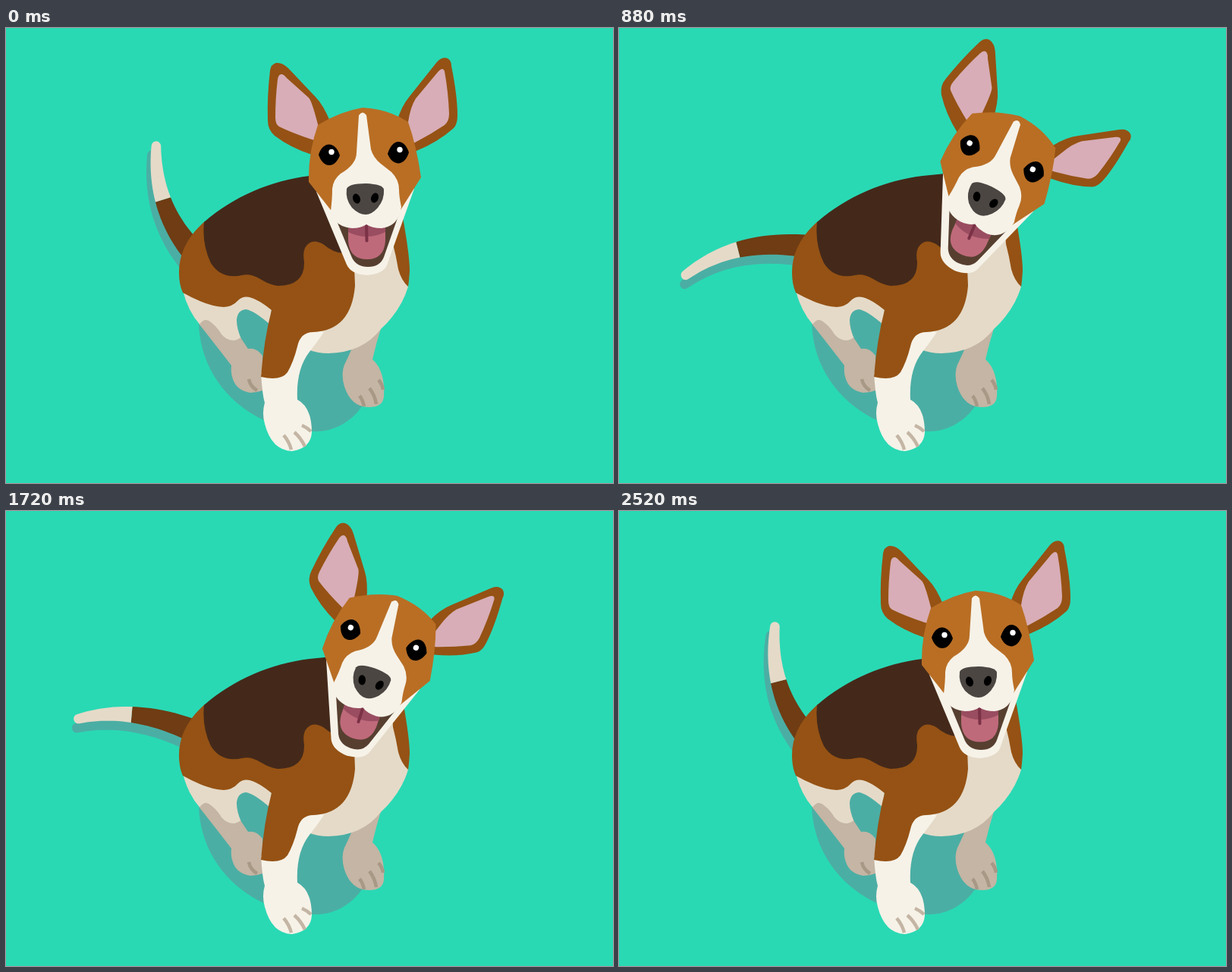
An HTML page that plays this animation: 800 px wide and 600 px high, repeating every 2.56 s.

```html
<!DOCTYPE html>
<html lang="en">
<head>
<meta charset="utf-8">
<title>Happy dog</title>
<style>
html, body { margin: 0; height: 100%; overflow: hidden; background: #29d9b4 }
svg { display: block; width: 800px; height: 600px }
.shade { fill: #4baea4 }
.brown { fill: #955214 }
.bark { fill: #6f3c13 }
.cream { fill: #e5dac8 }
.dim { fill: #c4b5a4 }
.white { fill: #f6f2e8 }
.pink { fill: #d8adb7 }
.line { fill: none; stroke: #a89886; stroke-width: 4.5 }
</style>
</head>
<body>
<svg viewBox="0 0 800 600">
  <path id="tailShade" class="shade"/>
  <path id="tailRoot" class="bark"/>
  <path id="tailTip" class="cream"/>

  <path class="shade" d="M254 385C254 470 325 532 408 532C440 532 460 512 470 498L450 400L300 350Z"/>
  <path class="dim" d="M457 420Q450 436 446 444Q441 456 446 473Q455 500 478 500Q497 500 498 486Q500 452 483 437Q488 415 495 393Z"/>
  <path class="line" d="M466 485Q470 490 472 499M479 475Q486 484 488 496M491 464Q496 470 497 477"/>
  <path class="cream" d="M233 346Q240 375 258 394L300 415L310 410Q304 396 304 385Q305 372 316 371Q326 372 348 391L352 350L300 340Z"/>
  <path class="dim" d="M255 391Q262 381 270 388Q279 395 284 404Q291 412 300 412Q306 411 309 408L319 423Q330 421 338 432V478Q330 481 322 481Q304 478 299 463Q296 455 297 445Q284 428 255 391Z"/>
  <path class="line" d="M320 463Q322 473 331 478"/>
  <path class="cream" d="M440 250L512 260Q518 330 530 341Q521 372 494 397Q470 428 425 429Q410 429 398 424L390 395Z"/>
  <path class="brown" d="M523 250Q532 300 532 320Q531 335 530 341Q521 333 517 318Q514 300 510 285L508 255Z"/>
  <path class="white" d="M336 455Q338 485 341 494Q337 508 341 522Q350 557 377 558Q402 554 403 533Q403 500 384 490Q382 450 400 427Q408 417 419 401L400 395Z"/>
  <path class="line" style="stroke:#c4b5a4" d="M366 537Q373 545 376 556M380 533Q389 541 394 552M390 524Q397 527 402 532"/>
  <path class="brown" d="M262 255Q228 285 228 322Q228 338 233 349Q265 367 287 368Q299 367 305 360Q312 353 321 355Q333 358 350 372Q340 410 336 460Q362 466 371 454Q379 440 384 420Q388 401 405 401Q455 399 460 340Q460 320 457 300L440 250L400 200Z"/>
  <path fill="#44291a" d="M261 256C300 222 350 201 400 195L440 191L445 297Q432 297 418 285Q402 276 394 290Q391 297 393 308Q394 340 358 340Q348 339 335 331Q322 323 311 326Q284 332 270 310Q258 285 261 256Z"/>

  <g id="head">
    <g id="earL">
      <path class="brown" d="M428 125Q418 101 408 91L372 53Q364 45 356 46Q349 48 348 56Q344 90 345 122Q345 134 354 142Q375 158 403 167L440 170Z"/>
      <path class="pink" d="M358 68Q359 60 364 61Q367 62 370 66L399 92Q403 96 411 127L418 151L403 147Q376 138 360 130Q355 127 355 118Q355 92 358 68Z"/>
    </g>
    <g id="earR">
      <path class="brown" d="M515 124Q521 103 532 90L567 46Q574 37 582 40Q587 43 587 50Q595 90 595 115Q595 127 590 132Q570 150 541 162L510 165Z"/>
      <path class="pink" d="M570 57Q576 51 578 57Q583 85 584 113Q584 123 578 128Q560 140 539 151L524 157L530 124Q533 104 540 93Z"/>
    </g>
    <path class="white" d="M409 216L449 312Q455 325 476 326Q497 324 502 313L538 212Z"/>
    <path fill="#573f30" d="M432 245L456 303Q462 315 477 315Q493 315 498 302L518 245Z"/>
    <path id="tongue" fill="#bf6a7b"/>
    <path fill="#9a4d60" d="M451 255V269Q475 281 500 269V255Z"/>
    <path id="crease" fill="none" stroke="#7b3246" stroke-width="4" stroke-linecap="round"/>
    <path fill="#b96e24" d="M411 128Q440 110 470 105Q505 107 530 124Q541 155 547 197L520 240H428L399 203Q398 165 411 128Z"/>
    <path class="white" d="M465 115Q470 108 475 115L481 160Q484 171 494 179L508 190Q518 200 518 213Q518 222 521 236Q517 262 495 264Q482 264 475 259Q468 264 456 264Q432 262 428 241Q430 225 430 212Q431 200 441 192Q462 180 462 164Z"/>
    <path fill="#4c4642" d="M449 212Q452 205 474 205Q497 206 498 213Q499 226 490 237Q482 246 474 246Q465 246 456 237Q447 226 449 212Z"/>
    <ellipse cx="462" cy="225" rx="4.8" ry="6.6" transform="rotate(-20 462 225)"/>
    <ellipse cx="486" cy="224" rx="4.8" ry="6.6" transform="rotate(20 486 224)"/>
    <path d="M412 167C418 149 434 149 440 168C434 185 418 186 412 167ZM503 166C509 145 525 145 531 164C525 183 510 183 503 166Z"/>
    <g id="glints" fill="#fff"><circle cx="429" cy="163.5" r="3.7"/><circle cx="519" cy="160.5" r="3.7"/></g>
  </g>
</svg>
<script>
const LOOP = 2560, STEP = 40, RAD = Math.PI / 180;
const { sin, cos, max, min, sqrt } = Math;
const part = id => document.getElementById(id);
const set = (id, attr, value) => part(id).setAttribute(attr, value);

function ease(x) {
  x = max(0, min(1, x));
  return x < .5 ? 2 * x * x : 1 - 2 * (1 - x) ** 2;
}
// Tilts over 480 ms, holds, and tilts back 1480 ms after it began.
const tilt = (t, start) => ease((t - start) / 480) - ease((t - start - 1480) / 480);

const base = [240, 287];
const polar = (deg, r) => [base[0] - r * cos(deg * RAD), base[1] - r * sin(deg * RAD)];
const wave = (p, [m, a, b, c, d, e]) =>
  m + a * cos(p) + b * sin(p) + c * sin(2 * p) + d * cos(3 * p) + e * sin(3 * p);

// Outline of a tapering band around a quadratic curve, from u0 to u1.
function band(mid, tip, u0, u1, capped) {
  const ctrl = mid.map((m, i) => 2 * m - (base[i] + tip[i]) / 2);
  const left = [], right = [];
  for (let i = 0; i <= 12; i++) {
    const u = u0 + (u1 - u0) * i / 12, v = 1 - u;
    const [x, y] = [0, 1].map(k => v * v * base[k] + 2 * u * v * ctrl[k] + u * u * tip[k]);
    const [dx, dy] = [0, 1].map(k => v * (ctrl[k] - base[k]) + u * (tip[k] - ctrl[k]));
    const w = (14.7 - 8.4 * u) / sqrt(dx * dx + dy * dy);
    left.push(`${x + dy * w} ${y - dx * w}`);
    right.unshift(`${x - dy * w} ${y + dx * w}`);
  }
  return `M${left.join('L')}${capped ? 'A6.3 6.3 0 0 1 ' : 'L'}${right.join('L')}Z`;
}

function drawTail(t) {
  const p = t / 640 * 2 * Math.PI;
  const midDeg = wave(p, [25.7, 36.1, -5.06, -1.8, -.4, -2.56]);
  const tipDeg = wave(p, [26.2, 49.6, -3.56, -1.5, -3.56, -2.72]);
  const mid = polar(midDeg, 69 + .38 * max(0, 34 - midDeg));
  const tip = polar(tipDeg, 134.5 + .0058 * (tipDeg - 48) ** 2);
  set('tailRoot', 'd', band(mid, tip, -.12, .5));
  set('tailTip', 'd', band(mid, tip, .5, 1, true));
  set('tailShade', 'd', band(mid, tip, -.12, 1, true));
  set('tailShade', 'transform', `translate(${-2 - .05 * tipDeg} 12)`);
}

function drawHead(t) {
  const h = tilt(t, 80), e = tilt(t, 0);
  set('head', 'transform', `translate(${8.5 * h} ${2 * h}) rotate(${24.5 * h} 473.5 225)`);
  set('earL', 'transform', `rotate(${15.5 * e} 432 168)`);
  set('earR', 'transform', `translate(537 161) rotate(${16.5 * e}) scale(1 ${1 - .07 * e}) translate(-537 -161)`);
  set('glints', 'transform', `translate(${-4.7 * h} ${1.3 * h})`);
  const pant = 2 * cos(t / 320 * 2 * Math.PI), y = 303 + pant;
  set('tongue', 'd', `M451 255V${y - 24}Q453 ${y} 476 ${y}Q498 ${y} 500 ${y - 24}V255Z`);
  set('crease', 'd', `M475 258L475.5 ${279.5 + pant / 2}`);
}

function frame() {
  const t = Math.floor(performance.now() % LOOP / STEP) * STEP;
  drawTail(t);
  drawHead(t);
  requestAnimationFrame(frame);
}
frame();
</script>
</body>
</html>
```
